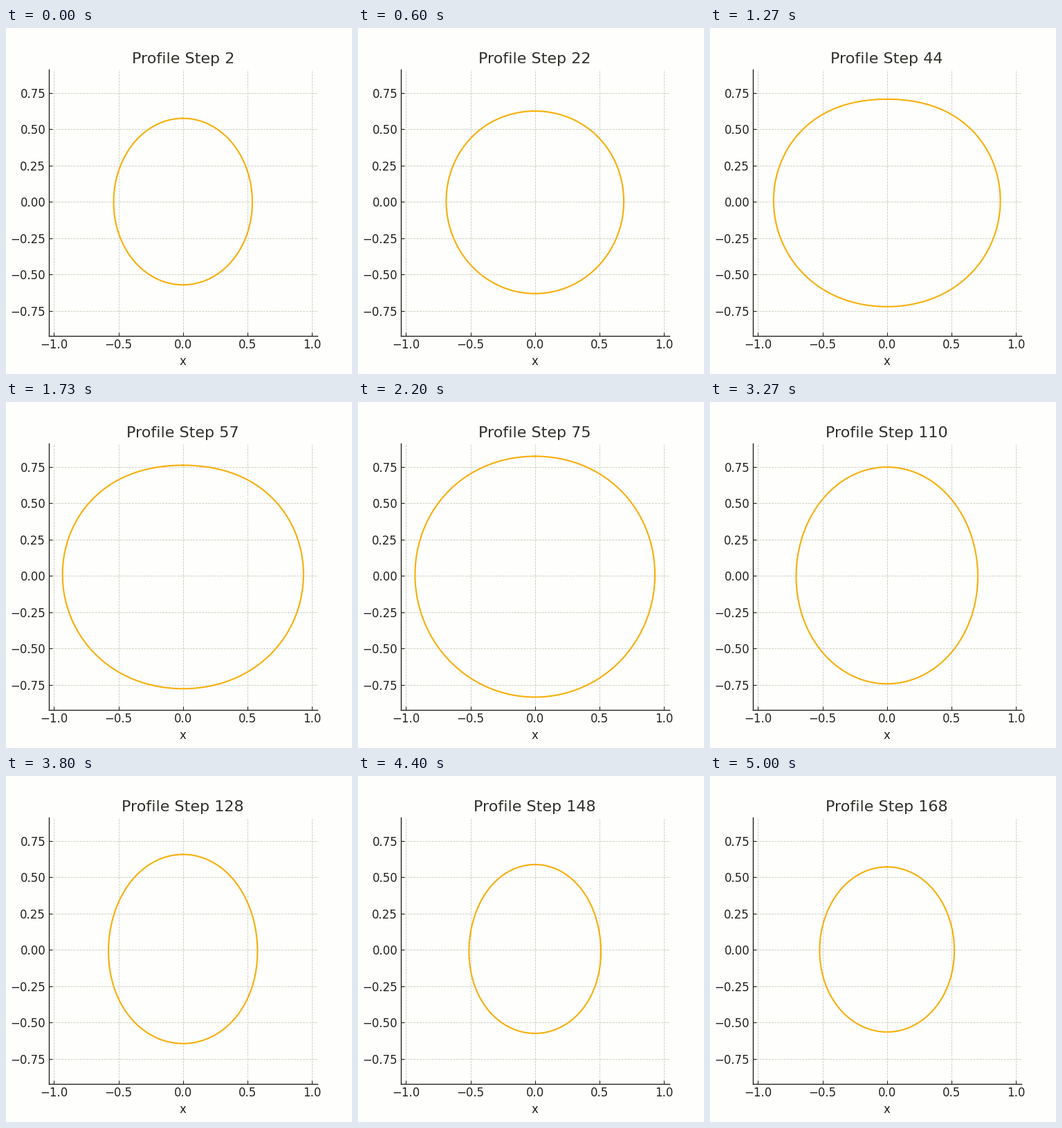
Recreate the animation shown at these times as a matplotlib script. Size 500x500 px, loop 5.07 s.

```python
import numpy as np
import matplotlib.pyplot as plt
from matplotlib.animation import FuncAnimation

FRAMES, TICK_MS, PERIOD = 169, 30, 170
PAPER, INK, TITLE, GRID, CURVE = "#fefefc", "#222220", "#30302c", "#cacabc", "#f8ae08"

theta = np.linspace(0, 2 * np.pi, 361)
c = np.cos(theta)
P2, P3 = (3 * c**2 - 1) / 2, (5 * c**3 - 3 * c) / 2


def wave(phase, mean, *harmonics):
    """Mean plus (cosine, sine) amplitudes of successive harmonics."""
    return mean + sum(a * np.cos(k * phase) + b * np.sin(k * phase)
                      for k, (a, b) in enumerate(harmonics, 1))


def profile(step):
    """Pulsating sphere with oscillating second and third Legendre modes."""
    phase = 2 * np.pi * step / PERIOD
    radius = wave(phase, .7084, (-.1607, .1017), (-.0012, -.0046), (-.0039, -.0037))
    stretch = wave(phase, -.0174, (.0315, -.0746), (.0123, .0086), (.0007, .0035))
    skew = wave(phase, -.001, (.003, -.0065))
    r = radius + stretch * P2 + skew * P3
    return r * np.sin(theta), r * c


plt.rcParams.update({
    "font.family": "DejaVu Sans", "font.size": 12,
    "axes.titlesize": 16, "axes.labelsize": 12,
    "axes.edgecolor": INK, "axes.linewidth": 1, "axes.labelcolor": INK,
    "axes.spines.top": False, "axes.spines.right": False,
    "xtick.direction": "in", "ytick.direction": "in",
    "xtick.color": INK, "ytick.color": INK,
    "xtick.labelsize": 12, "ytick.labelsize": 12,
})

fig, ax = plt.subplots(figsize=(5, 5), dpi=100, facecolor=PAPER)
fig.subplots_adjust(left=.124, right=.899, bottom=.111, top=.881)
ax.set_facecolor(PAPER)
ax.set(xlim=(-1.039, 1.039), ylim=(-.92, .912), xlabel="x", ylabel="y",
       xticks=np.arange(-1, 1.1, .5), yticks=np.arange(-.75, .8, .25))
ax.grid(color=GRID, linestyle="--", linewidth=.6)
line, = ax.plot([], [], color=CURVE, linewidth=1.5)
title = ax.set_title("", color=TITLE)


def update(i):
    # The picture changes 15 times a second, skipping two or three steps.
    shown = (TICK_MS * i + 20) * 15 // 1000
    step = -(-(20 * shown + 10) // 9)
    line.set_data(*profile(step))
    title.set_text(f"Profile Step {step}")
    return line, title


anim = FuncAnimation(fig, update, frames=FRAMES, interval=TICK_MS,
                     repeat=True, repeat_delay=0)
plt.show()
```
